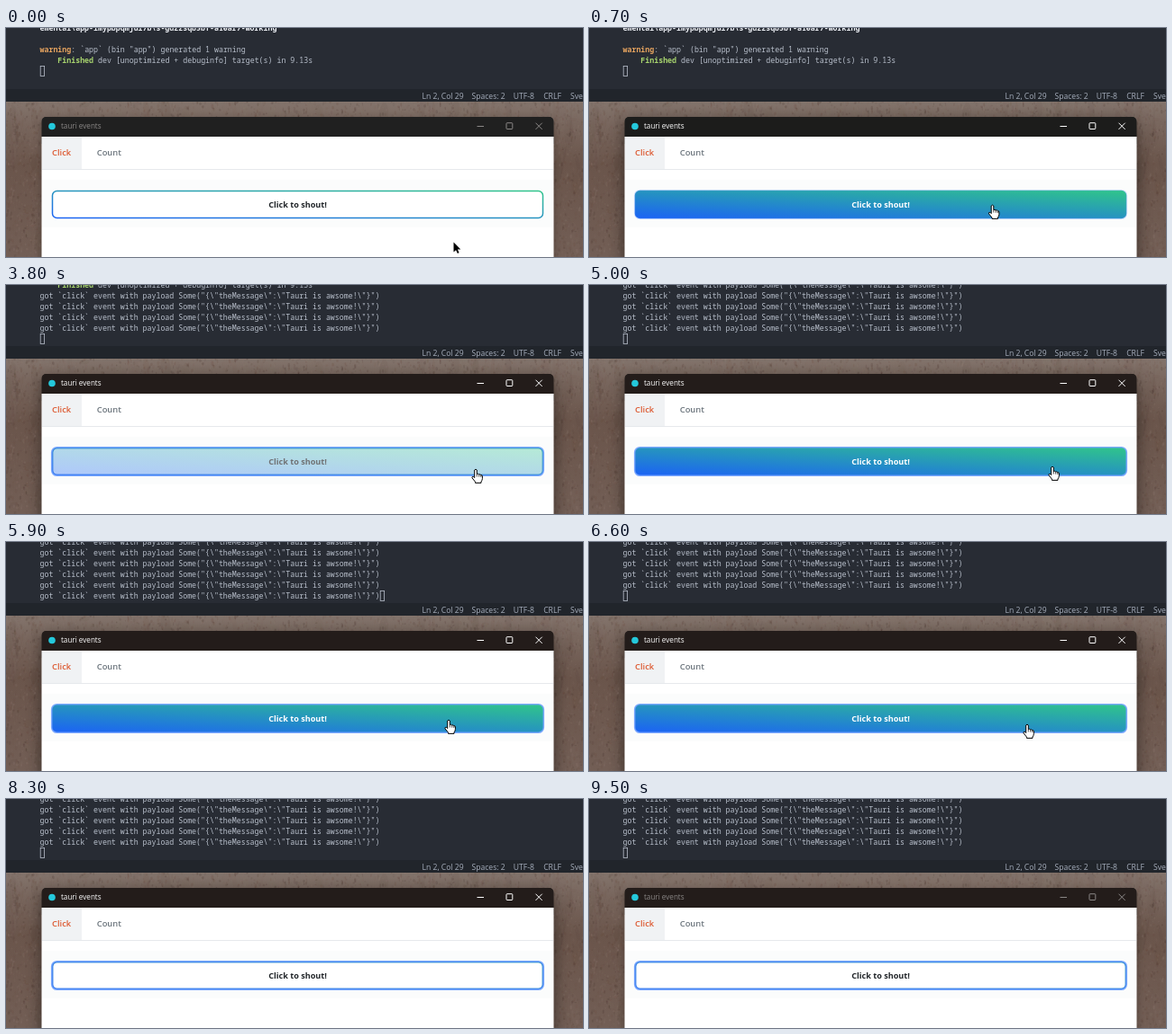
These frames come from a looping animation (640 by 255 pixels, 9600 ms). An HTML page with a canvas:

```html
<!DOCTYPE html>
<html lang="en">
<head>
<meta charset="utf-8">
<title>tauri events</title>
<style>
html, body { margin: 0; width: 100%; height: 100%; overflow: hidden; background: #282c34; }
canvas { display: block; width: 640px; height: 255px; }
</style>
</head>
<body>
<canvas id="stage" width="640" height="255"></canvas>
<script>
const LOOP = 9600, STEP = 100;
const W = 640, H = 255;
const ctx = document.getElementById('stage').getContext('2d');
const SANS = '"Open Sans", "Noto Sans", sans-serif';
const MONO = '"Noto Sans Mono", "Liberation Mono", monospace';
const CELL = 4.967, ROW = 11.9, LEFT = 37.5;
const INK = '#b8bfcb';
const BTN = { x: 51.5, y: 181.5, w: 544, h: 30 };

const clamp = v => Math.max(0, Math.min(1, v));
const ramp = (t, a, b) => clamp((t - a) / (b - a));
const ease = p => p * p * (3 - 2 * p);

function seeded(seed) {
  return () => {
    seed = (seed * 1664525 + 1013904223) >>> 0;
    return seed / 4294967296;
  };
}

// Rusty wall behind the window, painted once
function makeWall() {
  const c = document.createElement('canvas');
  c.width = W;
  c.height = H;
  const g = c.getContext('2d');
  const base = g.createLinearGradient(0, 82, 0, H);
  base.addColorStop(0, '#83746c');
  base.addColorStop(0.15, '#78665d');
  base.addColorStop(0.4, '#6a554b');
  base.addColorStop(1, '#725e55');
  g.fillStyle = base;
  g.fillRect(0, 0, W, H);
  const rnd = seeded(41);
  const tones = ['62,42,35', '148,130,120', '104,70,56', '128,108,98'];
  const streaks = (n, width, height, alpha) => {
    for (let i = 0; i < n; i++) {
      const tone = tones[Math.floor(rnd() * tones.length)];
      g.fillStyle = `rgba(${tone},${alpha * (0.3 + rnd())})`;
      g.beginPath();
      g.ellipse(rnd() * W, 78 + rnd() * 180, 0.5 + rnd() * width, 0.5 + rnd() * height,
        (rnd() - 0.5) * 0.4, 0, 7);
      g.fill();
    }
  };
  streaks(500, 5, 22, 0.06);
  streaks(9000, 0.9, 2, 0.16);
  return c;
}
const wall = makeWall();

function text(s, x, y, font, color, align = 'left') {
  ctx.font = font;
  ctx.fillStyle = color;
  ctx.textAlign = align;
  ctx.fillText(s, x, y);
}

function round(x, y, w, h, r) {
  ctx.beginPath();
  ctx.roundRect(x, y, w, h, r);
}

// Each line is a list of [text, colour, bold]
const HEAD = [
  [['emental\\app-imypbpqmjui7b\\s-gdzzsqb5bf-a10ar7-working', '#eceff4', true]],
  [],
  [['warning', '#e5a35f', true], [': `app` (bin "app") generated 1 warning', INK]],
  [['    ', INK], ['Finished', '#a9d66f', true],
   [' dev [unoptimized + debuginfo] target(s) in 9.13s', INK]]
];
const EVENT = [['got `click` event with payload Some("{\\"theMessage\\":\\"Tauri is awsome!\\"}")', INK]];
const EVENT_LEN = EVENT[0][0].length;
const LOG_TIMES = [800, 1600, 2200, 2800, 4400];

function drawLine(parts, row) {
  let col = 0;
  for (const [s, color, bold] of parts) {
    text(s, LEFT + col * CELL, 3.4 + row * ROW, `${bold ? 'bold ' : ''}8.28px ${MONO}`, color);
    col += s.length;
  }
}

function drawTerminal(t) {
  ctx.fillStyle = '#282c34';
  ctx.fillRect(0, 0, W, 68);
  const count = LOG_TIMES.filter(at => t >= at).length;
  const lines = HEAD.concat(Array(count).fill(EVENT));
  const scroll = Math.max(0, lines.length - 5);
  lines.forEach((line, i) => { if (i >= scroll) drawLine(line, i - scroll); });

  // Rapid clicks: the last row is filled, then scrolled away
  const printing = t >= 5000 && t < 7600 && ((t - 5000) / STEP) % 2 === 1;
  const row = lines.length - scroll;
  if (printing) drawLine(EVENT, row);
  const cx = printing ? LEFT + EVENT_LEN * CELL : LEFT;
  ctx.strokeStyle = INK;
  ctx.lineWidth = 0.8;
  ctx.strokeRect(Math.round(cx) + 0.2, Math.round(row * ROW - 6) + 0.5, 4.4, 11);

  ctx.fillStyle = '#21252b';
  ctx.fillRect(0, 68, W, 14);
  [['Ln 2, Col 29', 461.5], ['Spaces: 2', 516.5], ['UTF-8', 562.7], ['CRLF', 596.2], ['Svelte', 626]]
    .forEach(([s, x]) => text(s, x, 79, `8.6px ${SANS}`, '#a6aebc'));
}

function drawTitle(t, active) {
  ctx.fillStyle = t < 600 ? '#202020' : t < 800 ? '#1c1c1b' : '#231c1a';
  round(39.5, 99, 568, 30, [5, 5, 0, 0]);
  ctx.fill();
  ctx.fillStyle = '#24c8db';
  ctx.beginPath();
  ctx.arc(51, 109.5, 3.8, 0, 7);
  ctx.fill();
  const color = active ? '#fff' : '#8a8786';
  text('tauri events', 61, 112.2, `500 8.15px ${SANS}`, color);
  ctx.strokeStyle = color;
  ctx.lineWidth = 1;
  ctx.beginPath();
  ctx.moveTo(522.5, 109.5);
  ctx.lineTo(530, 109.5);
  ctx.moveTo(587.5, 105.7);
  ctx.lineTo(594.7, 112.9);
  ctx.moveTo(594.7, 105.7);
  ctx.lineTo(587.5, 112.9);
  ctx.stroke();
  round(555, 105.7, 6.8, 6.8, 0.8);
  ctx.stroke();
}

function drawWindow(t) {
  const active = t >= 600 && t < 9500;
  ctx.drawImage(wall, 0, 82, W, H - 82, 0, 82, W, H - 82);
  ctx.save();
  ctx.beginPath();
  ctx.rect(0, 82, W, H);
  ctx.clip();
  ctx.shadowColor = `rgba(0,0,0,${active ? 0.5 : 0.3})`;
  ctx.shadowBlur = active ? 18 : 10;
  ctx.shadowOffsetY = active ? 6 : 3;
  ctx.fillStyle = '#202020';
  round(40, 99, 567, 180, 5);
  ctx.fill();
  ctx.restore();
  drawTitle(t, active);

  ctx.fillStyle = '#fff';
  ctx.fillRect(39.5, 121, 568, 135);
  ctx.fillStyle = '#fbfcfc';
  ctx.fillRect(40, 169, 567, 53);
  ctx.fillStyle = '#f0f2f4';
  ctx.fillRect(40, 121, 44, 36);
  ctx.fillStyle = '#e6e9ec';
  ctx.fillRect(40, 157, 567, 1);
  text('Click', 51, 142.3, `600 9.4px ${SANS}`, '#dd5a32');
  text('Count', 100.7, 142.3, `600 9.4px ${SANS}`, '#6c757d');
}

// Runs between the two corners, its middle line through the other two
function cornerGradient({ x, y, w, h }) {
  const k = w * h / (w * w + h * h);
  const cx = x + w / 2, cy = y + h / 2;
  const g = ctx.createLinearGradient(cx - h * k, cy + w * k, cx + h * k, cy - w * k);
  g.addColorStop(0, '#1b63f4');
  g.addColorStop(1, '#30c48b');
  return g;
}

// How far the button is filled by hovering, 0 to 1
function hoverFill(t) {
  if (t < 3200) return ramp(t, 200, 500);
  if (t < 3700) return 1 - ramp(t, 3100, 3400);
  if (t < 8000) return ramp(t, 3690, 4000);
  return 1 - ramp(t, 7950, 8300);
}

function drawButton(t) {
  const { x, y, w, h } = BTN;
  const fill = hoverFill(t);
  const focus = ramp(t, 600, 900);
  const paint = cornerGradient(BTN);
  round(x, y, w, h, 5);
  ctx.fillStyle = '#fff';
  ctx.fill();
  ctx.globalAlpha = fill;
  ctx.fillStyle = paint;
  ctx.fill();
  ctx.globalAlpha = 1;
  ctx.lineWidth = 1.5;
  ctx.strokeStyle = paint;
  ctx.stroke();
  if (focus > 0) {
    ctx.strokeStyle = `rgba(52,124,232,${0.85 * focus * (1 - fill)})`;
    ctx.stroke();
    round(x - 0.8, y - 0.8, w + 1.6, h + 1.6, 5.8);
    ctx.strokeStyle = `rgba(112,160,255,${0.85 * focus})`;
    ctx.lineWidth = 1.6;
    ctx.stroke();
  }
  const mix = (a, b) => Math.round(a + (b - a) * fill);
  text('Click to shout!', 323.5, 199.5, `bold 9.1px ${SANS}`,
    `rgb(${mix(33, 255)},${mix(37, 255)},${mix(41, 255)})`, 'center');
}

// Pointer tip: [time, x, y]
const PATH = [
  [0, 496.5, 238.5], [500, 447.5, 197], [3100, 447.5, 197], [3400, 548, 236],
  [3600, 548, 236], [3800, 521, 205], [4100, 514, 202], [5000, 514, 202],
  [5900, 491, 198], [6600, 486, 203], [7300, 481, 206], [7900, 481, 206], [8300, 560, 270]
];

function pointerAt(t) {
  const i = PATH.findIndex(p => p[0] > t);
  if (i < 0) return null;
  const [t0, x0, y0] = PATH[i - 1], [t1, x1, y1] = PATH[i];
  const p = ease(ramp(t, t0, t1));
  return [x0 + (x1 - x0) * p, y0 + (y1 - y0) * p];
}

const HAND = new Path2D('M-1.3 1Q0-.7 1.3 1V5.6Q2.6 4.7 3.7 6Q5 5.3 5.8 6.7Q7.3 6.3 7.4 8V10.6Q7.2 12.6 6 14V15.4H-.5V14.2L-4 9.8Q-4.3 8-2.6 8.3L-1.3 9.6Z');
const KNUCKLES = new Path2D('M1.3 5.6V8.5M3.7 6V8.7M5.8 6.7V9');
const ARROW = new Path2D('M0 0V11L2.6 8.7L4.3 12.5L6.1 11.7L4.4 8H7.8Z');

function drawPointer(t) {
  const at = pointerAt(t);
  if (!at) return;
  const [x, y] = at;
  const over = y > BTN.y && y < BTN.y + BTN.h;
  ctx.save();
  ctx.translate(x, y);
  ctx.lineJoin = 'round';
  ctx.lineWidth = 1;
  ctx.fillStyle = over ? '#fff' : '#000';
  ctx.strokeStyle = over ? '#000' : '#fff';
  const shape = over ? HAND : ARROW;
  if (!over) ctx.stroke(shape);
  ctx.fill(shape);
  if (over) {
    ctx.stroke(shape);
    ctx.lineWidth = 0.7;
    ctx.stroke(KNUCKLES);
  }
  ctx.restore();
}

function draw(now) {
  const t = Math.floor((now % LOOP) / STEP) * STEP;
  ctx.clearRect(0, 0, W, H);
  drawTerminal(t);
  drawWindow(t);
  drawButton(t);
  drawPointer(t);
}

let start;
function frame(now) {
  start ??= now;
  draw(Math.max(0, now - start));
  requestAnimationFrame(frame);
}
draw(0);
requestAnimationFrame(frame);
</script>
</body>
</html>
```
